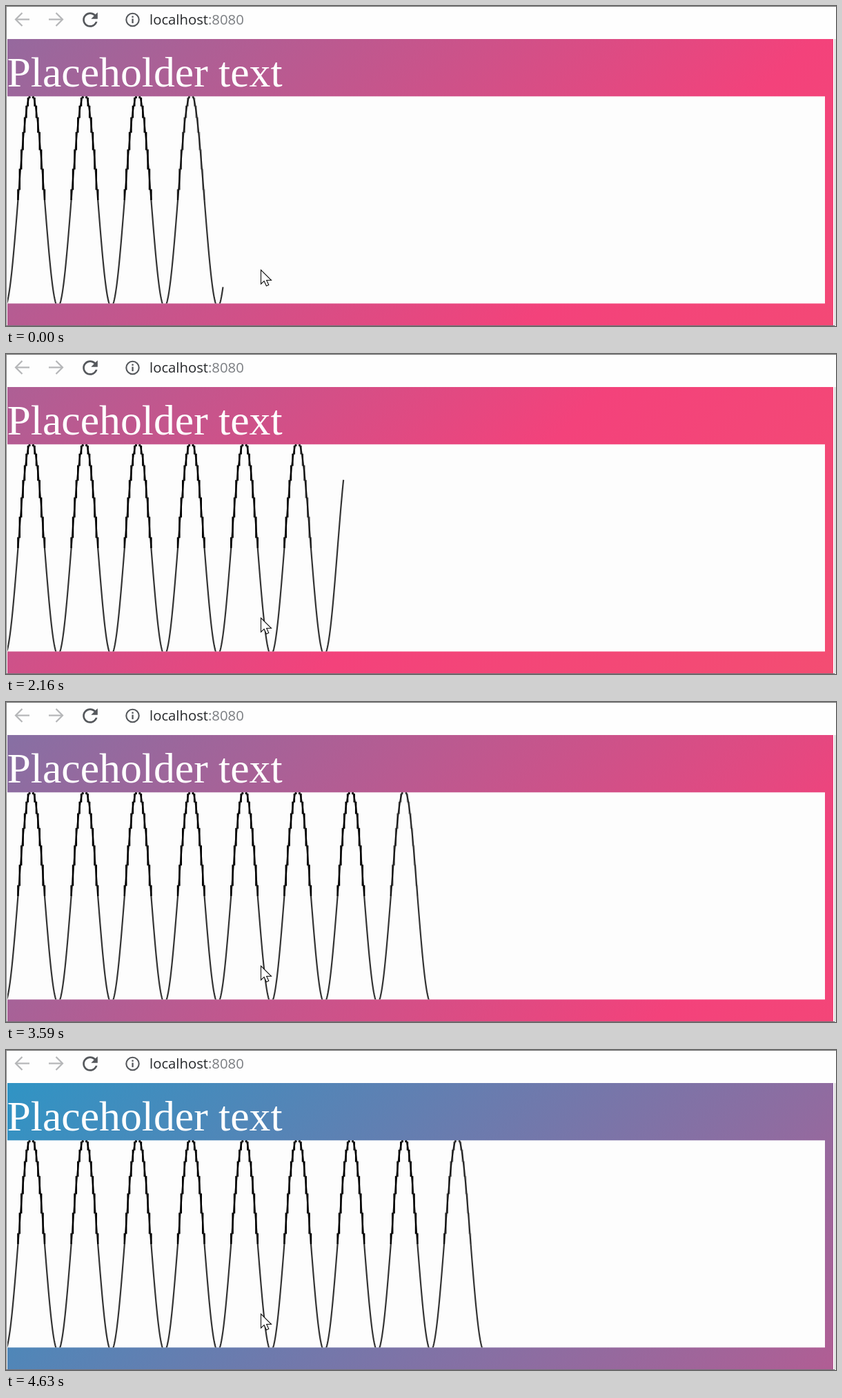
These frames come from a looping animation (1203x465 px, 4730 ms). An HTML page with a canvas:

```html
<!DOCTYPE html>
<html lang="en">
<head>
<meta charset="utf-8">
<title>Sine wave</title>
<style>
  html, body { margin: 0; width: 100%; height: 100%; overflow: hidden; background: #fff; }
  canvas { display: block; width: 1203px; height: 465px; }
</style>
</head>
<body>
<canvas id="stage" width="1203" height="465"></canvas>
<script>
const ctx = document.getElementById('stage').getContext('2d');
const LOOP = 4730;

// pen: advances one stride at a time
const PEN_START = 314.5, STRIDE = 15.875, STRIDE_MS = 193, PEN_PHASE = 0.4;

// backdrop: a diagonal gradient four times the page size, swinging sideways
const PAGE = { x: 2, y: 48, w: 1197, h: 1080 };
const SWING_MS = 7500, TURN = 2650;
const SPAN = (PAGE.w + PAGE.h) * 4 / 3;
const COLORS = ['#10d8a8', '#00a8d6', '#f3427b', '#f37058'];

const VIEW = { x: 2, y: 131.3, w: 1185, h: 301 };
const MID = 282, AMP = 155, PERIOD = 77.2, PEAK = 36.7, CELL = PERIOD / 32;

const waveY = x => MID - AMP * Math.cos((x - PEAK) * 2 * Math.PI / PERIOD);
const clamp = v => Math.max(0, Math.min(1, v));

// cubic-bezier(.25, .1, .25, 1)
function ease(x) {
  const curve = (s, a, b) => 3 * a * s * (1 - s) ** 2 + 3 * b * s * s * (1 - s) + s ** 3;
  let lo = 0, hi = 1;
  for (let i = 0; i < 24; i++) {
    const mid = (lo + hi) / 2;
    if (curve(mid, .25, .25) < x) lo = mid; else hi = mid;
  }
  return curve(lo, .1, 1);
}

function rect(color, x, y, w, h) {
  ctx.fillStyle = color;
  ctx.fillRect(x, y, w, h);
}

function line(color, width, ...pts) {
  ctx.strokeStyle = color;
  ctx.lineWidth = width;
  ctx.beginPath();
  pts.forEach(([x, y]) => ctx.lineTo(x, y));
  ctx.stroke();
}

function text(str, x, y, font, color) {
  ctx.font = font;
  ctx.fillStyle = color;
  ctx.fillText(str, x, y);
  return x + ctx.measureText(str).width;
}

const RELOAD = new Path2D('M17.65 6.35C16.2 4.9 14.21 4 12 4c-4.42 0-7.99 3.58-7.99 8s3.57 8 7.99 8' +
  'c3.73 0 6.84-2.55 7.73-6h-2.08c-.82 2.33-3.04 4-5.65 4-3.31 0-6-2.69-6-6s2.69-6 6-6' +
  'c1.66 0 3.14.69 4.22 1.78L13 11h7V4z');
const POINTER = new Path2D('M0 0V20.5L4.6 16.2L7.9 23.3L11.3 21.8L8.2 15H15Z');

function arrow(tip, dir) {
  line('#b5b6b8', 2.2, [tip + 20 * dir, 19.5], [tip, 19.5]);
  line('#b5b6b8', 2.2, [tip + 9.5 * dir, 10], [tip, 19.5], [tip + 9.5 * dir, 29]);
}

function toolbar() {
  const ink = '#55585c';
  rect('#fefefe', 0, 0, 1203, 465);
  arrow(14, 1);
  arrow(82, -1);

  ctx.save();
  ctx.translate(105.8, 3.8);
  ctx.scale(1.35, 1.35);
  ctx.fillStyle = ink;
  ctx.fill(RELOAD);
  ctx.restore();

  ctx.strokeStyle = ink;
  ctx.lineWidth = 2.1;
  ctx.beginPath();
  ctx.arc(183.5, 20, 9.2, 0, 7);
  ctx.stroke();
  rect(ink, 182.4, 18.5, 2.3, 6.5);
  rect(ink, 182.4, 14.5, 2.3, 2.4);

  const font = '20.3px "Open Sans", "Noto Sans", sans-serif';
  const x = text('localhost', 208, 27, font, '#26282b');
  text(':8080', x, 27, font, '#7b7e82');
}

function page(t) {
  const x = (t - TURN) / SWING_MS;
  const swing = x < 0 ? 1 - ease(1 + x) : ease(x);
  // x + y where the pink stop crosses the page
  const pink = PAGE.x + PAGE.y + PAGE.h * 7 / 6 - PAGE.w / 3 + 3 * PAGE.w * swing;
  const a = (pink - 2 * SPAN) / 2, b = (pink + SPAN) / 2;
  const g = ctx.createLinearGradient(a, a, b, b);
  COLORS.forEach((c, i) => g.addColorStop(i / 3, c));
  rect(g, PAGE.x, PAGE.y, PAGE.w, PAGE.h);
  text('Placeholder text', 1.5, 117, '61.7px "Liberation Serif", "Times New Roman", serif', '#fff');
  rect('#fdfdfd', VIEW.x, VIEW.y, VIEW.w, VIEW.h);
}

function wave(end) {
  ctx.save();
  ctx.beginPath();
  ctx.rect(VIEW.x, VIEW.y, VIEW.w, VIEW.h);
  ctx.clip();

  const pts = [];
  for (let x = 1; x < end; x += 0.8) pts.push([x, waveY(x)]);
  pts.push([end, waveY(end)]);
  ctx.lineJoin = 'round';
  line('#343434', 2.2, ...pts);

  // the upper half darkens into stepped columns behind the pen
  ctx.beginPath();
  ctx.rect(VIEW.x, VIEW.y, VIEW.w, MID - VIEW.y);
  ctx.clip();
  for (let x = PEAK % CELL; x < end - 10; x += CELL) {
    const ys = [x - CELL / 2, x, x + CELL / 2].map(waveY);
    const top = Math.min(...ys) - 0.5, low = Math.max(...ys) + 0.5;
    ctx.globalAlpha = clamp((end - x - 10) / 70);
    rect('#000', x - 1.2, top, 2.4, low - top);
  }
  ctx.restore();
}

function frameLines() {
  rect('#6e6e6e', 0, 0, 1203, 1);
  rect('#8a8a8a', 0, 0, 1, 465);
  rect('#77737a', 0, 464, 1201, 1);
  rect('#b9b9b9', 1201, 48, 1, 417);
}

function pointer() {
  ctx.save();
  ctx.translate(369.5, 383.5);
  ctx.fillStyle = '#fff';
  ctx.fill(POINTER);
  ctx.strokeStyle = '#111';
  ctx.lineWidth = 1.1;
  ctx.stroke(POINTER);
  ctx.restore();
}

function draw(now) {
  const t = now % LOOP;
  toolbar();
  page(t);
  wave(PEN_START + STRIDE * Math.floor(t / STRIDE_MS + PEN_PHASE));
  frameLines();
  pointer();
}

let start;
function tick(now) {
  if (start === undefined) start = now;
  draw(Math.max(0, now - start));
  requestAnimationFrame(tick);
}
draw(0);
requestAnimationFrame(tick);
</script>
</body>
</html>
```
